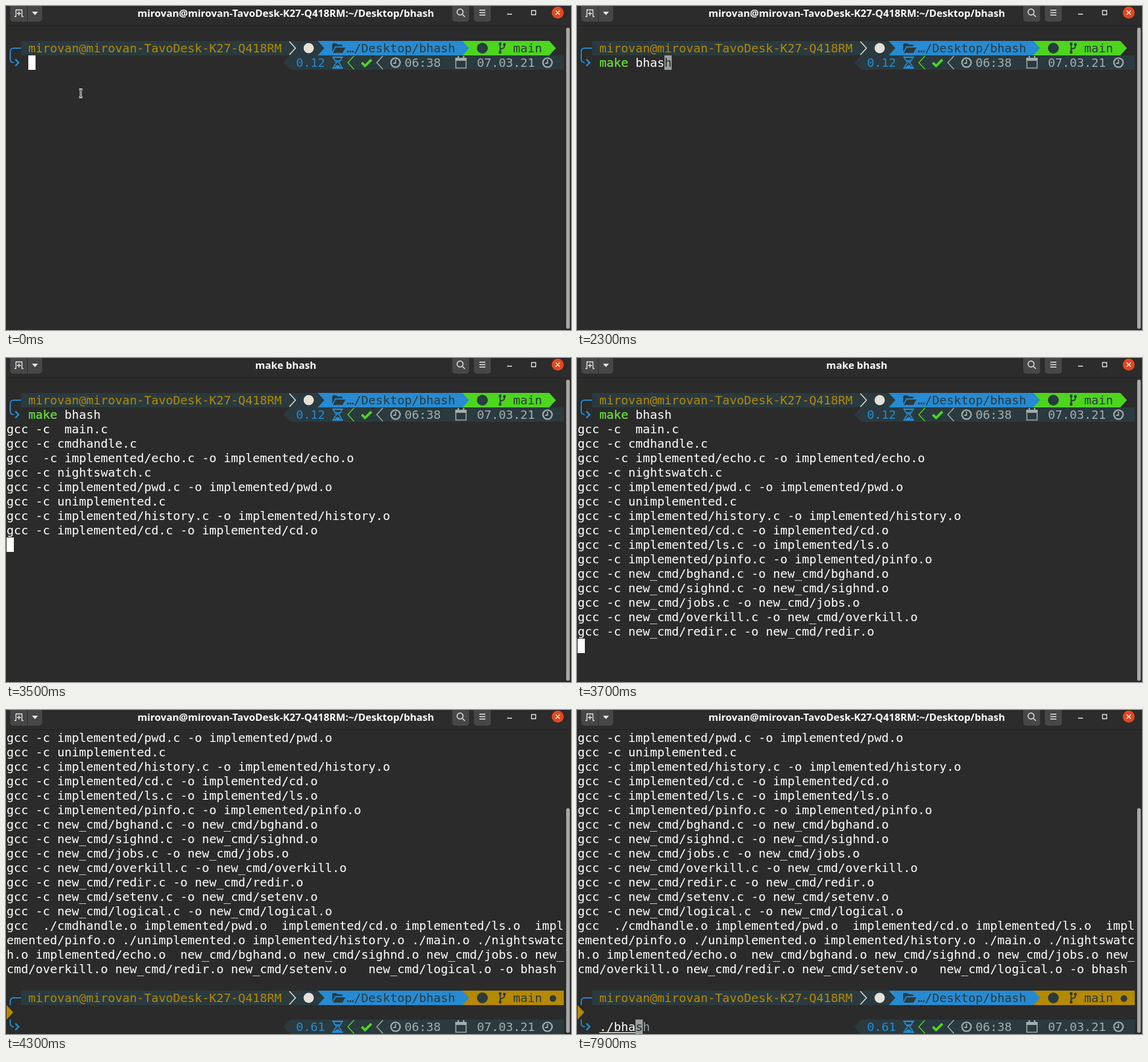
An HTML page with a canvas that plays this animation: 937 px wide and 538 px high, repeating every 8 s.

```html
<!DOCTYPE html>
<html lang="en">
<head>
<meta charset="utf-8">
<title>Terminal build</title>
<style>
  html, body { margin: 0; width: 100%; height: 100%; overflow: hidden; background: #2a2b2a; }
  canvas { display: block; }
</style>
</head>
<body>
<canvas id="stage" width="937" height="538"></canvas>
<script>
const ctx = document.getElementById('stage').getContext('2d');
const LOOP = 8000, CELL = 12, ROW = 24, TOP = 34, VISIBLE_ROWS = 21, COLUMNS = 77;
const MONO = '20px "DejaVu Sans Mono", monospace';
const BG = '#2a2b2a', TEAL = '#2a3a3f', BLUE = '#268bd2', GREEN = '#4cd61d', YELLOW = '#b58900',
      GREY = '#a5adab', HINT = '#98a1a1', LIGHT = '#e6e2d8', WHITE = '#fff', RED = '#dc322f';
const HOST = 'mirovan@mirovan-TavoDesk-K27-Q418RM';
const SHELL_TITLE = HOST + ':~/Desktop/bhash';

const withObject = path => `${path}.c -o ${path}.o`;
const inDir = (dir, names) => names.split(' ').map(name => 'gcc -c ' + withObject(dir + '/' + name));
const COMPILE = [
  'gcc -c  main.c', 'gcc -c cmdhandle.c', 'gcc  -c ' + withObject('implemented/echo'), 'gcc -c nightswatch.c',
  ...inDir('implemented', 'pwd'), 'gcc -c unimplemented.c',
  ...inDir('implemented', 'history cd ls pinfo'),
  ...inDir('new_cmd', 'bghand sighnd jobs overkill redir setenv logical')
];
const LINK = ('gcc  ./cmdhandle.o implemented/pwd.o  implemented/cd.o implemented/ls.o  implemented/pinfo.o ' +
  './unimplemented.o implemented/history.o ./main.o ./nightswatch.o implemented/echo.o  new_cmd/bghand.o ' +
  'new_cmd/sighnd.o new_cmd/jobs.o new_cmd/overkill.o new_cmd/redir.o new_cmd/setenv.o   new_cmd/logical.o -o bhash')
  .match(new RegExp(`.{1,${COLUMNS}}`, 'g'));

// [time, typed, suggestion, cursor visible]
const MAKE_INPUT = [
  [0, '', '', 1], [300, '', '', 0], [500, '', '', 1], [700, 'ma', 'ke clean', 1],
  [1000, 'make', ' clean', 1], [1100, 'make ', 'clean', 1], [1700, 'make ', 'clean', 0],
  [1800, 'make ', 'clean', 1], [2000, 'make b', 'hash', 1], [2100, 'make bha', 'sh', 1],
  [2300, 'make bhas', 'h', 1], [2700, 'make bhash', '', 1], [3200, 'make bhash', '', 0]
];
const RUN_INPUT = [
  [3900, '', '', 1], [4300, '', '', 0], [4400, '', '', 1], [5000, '', '', 0], [5600, '', '', 1],
  [6200, '', '', 0], [6800, '', '', 1], [6900, '.', '/bhash', 1], [7200, './', 'bhash', 1],
  [7500, './', 'bhash', 0], [7800, './', 'bhash', 1], [7900, './bha', 'sh', 1]
];
// [time, compile lines printed]
const PROGRESS = [[0, 0], [3200, 1], [3300, 3], [3400, 5], [3500, 8], [3600, 12], [3700, 15], [3800, 17]];
const at = (steps, time) => steps.filter(step => step[0] <= time).pop();

function rect(x, y, w, h, color) {
  ctx.fillStyle = color;
  ctx.fillRect(x, y, w, h);
}
function disc(x, y, r, color) {
  ctx.fillStyle = color;
  ctx.beginPath();
  ctx.arc(x, y, r, 0, 7);
  ctx.fill();
}
function box(x, y, w, h, radii, color) {
  ctx.fillStyle = color;
  ctx.beginPath();
  ctx.roundRect(x, y, w, h, radii);
  ctx.fill();
}
function fillPath(d, color) {
  ctx.fillStyle = color;
  ctx.fill(new Path2D(d));
}
function strokePath(d, color, width = 2) {
  ctx.strokeStyle = color;
  ctx.lineWidth = width;
  ctx.stroke(new Path2D(d));
}
function text(str, x, y, color) {
  ctx.font = MONO;
  ctx.fillStyle = color;
  [...str].forEach((ch, i) => ctx.fillText(ch, x + i * CELL, y + 19));
}
function arrow(x, color) {
  fillPath(`M${x} 0L${x + 11} 12L${x} 24Z`, color);
}
function clock(x) {
  ctx.strokeStyle = GREY;
  ctx.lineWidth = 2.4;
  ctx.beginPath();
  ctx.arc(x, 12, 7.6, 0, 7);
  ctx.stroke();
  strokePath(`M${x} 7V13H${x - 4}`, GREY, 1.8);
}

function statusRow(elapsed) {
  fillPath('M471 0L460 12L471 24Z', TEAL);
  rect(471, 0, 454, 24, TEAL);
  text(elapsed, 481, 0, BLUE);
  strokePath('M541 3H559M541 21H559', BLUE, 2.4);
  strokePath('M543.5 3C543.5 9 548 10 548 12S543.5 15 543.5 21M556.5 3C556.5 9 552 10 552 12S556.5 15 556.5 21', BLUE, 1.8);
  fillPath('M545 20Q550 12 555 20ZM546 8H554L550 12Z', BLUE);
  strokePath('M577 1L567 12L577 23', GREEN, 1.6);
  strokePath('M590 12L595.5 17.5L606 7', GREEN, 4);
  strokePath('M625 1L615 12L625 23', GREY, 1.6);
  clock(646);
  text('06:38', 661, 0, GREY);
  strokePath('M746 5H763V21H746Z', GREY, 1.6);
  rect(745, 4, 19, 5, GREY);
  strokePath('M750 1V6M759 1V6', GREY, 2.4);
  text('07.03.21', 781, 0, GREY);
  clock(898);
}

function prompt(y, elapsed, dirty) {
  ctx.save();
  ctx.translate(0, y);
  const gitColor = dirty ? YELLOW : GREEN;
  rect(25, 0, 492, 24, TEAL);
  text(HOST, 37, 0, YELLOW);
  strokePath('M470 1L480 12L470 23', LIGHT, 1.6);
  disc(502, 12, 8.5, LIGHT);
  rect(517, 0, 240, 24, BLUE);
  arrow(517, TEAL);
  fillPath('M541 18V6Q541 4 543 4H548L550 6H556Q558 6 558 8V9H546ZM542 20L547 11H563L558 20Z', TEAL);
  text('…/Desktop/bhash', 565, 0, TEAL);
  rect(757, 0, dirty ? 168 : 144, 24, gitColor);
  arrow(757, BLUE);
  disc(790, 12, 9, TEAL);
  strokePath('M819.5 7V17M826.5 8V9Q826.5 12 823 12.5Q819.5 13 819.5 16', TEAL, 2);
  [[819.5, 5], [819.5, 19], [826.5, 6]].forEach(([x, cy]) => disc(x, cy, 2.4, TEAL));
  text('main', 841, 0, TEAL);
  if (dirty) disc(907, 13, 5.5, TEAL);
  else arrow(901, gitColor);

  strokePath('M25 12H13Q7 12 7 18V24', BLUE);
  if (dirty) {
    ctx.translate(0, ROW);
    arrow(1, gitColor);
  }
  ctx.translate(0, ROW);
  strokePath('M7 0V6Q7 12 13 12', BLUE);
  strokePath('M15.5 6.5L21 12L15.5 17.5', BLUE, 2.6);
  statusRow(elapsed);
  ctx.restore();
}

function inputLine(y, [, typed, suggestion, cursorOn]) {
  const x = 37, command = typed.split(' ')[0], isPath = command.startsWith('./');
  const color = isPath ? WHITE : ['make', '.'].includes(command) ? GREEN : RED;
  text(typed, x, y, WHITE);
  const cursorX = x + typed.length * CELL;
  if (command) {
    const width = command.length * CELL;
    if (!isPath) {
      text(command, x, y, color);
    } else {
      rect(x, y + 21, width, 1.4, WHITE);
    }
  }
  text(suggestion, cursorX, y, HINT);
  if (cursorOn) {
    rect(cursorX, y, CELL, ROW, suggestion ? HINT : WHITE);
    text(suggestion.slice(0, 1), cursorX, y, BG);
  }
}

function titleBar(title) {
  rect(0, 0, 937, 33, '#2c2c2c');
  rect(0, 32, 937, 1, '#232323');
  box(7, -6, 53, 32, 5, '#474747');
  rect(35, 0, 1, 26, '#2e2e2e');
  box(740, -6, 28, 32, 5, '#474747');
  box(776, -6, 28, 32, 5, '#474747');
  strokePath('M14 17.5H16.5V6.5H26.5V17.5H29M21.5 9V16M18 12.5H25', '#f0f0f0', 1.3);
  fillPath('M43 9.5H53L48 15Z', '#f0f0f0');
  ctx.font = 'bold 16.6px "Noto Sans", sans-serif';
  ctx.textAlign = 'center';
  ctx.fillStyle = WHITE;
  ctx.fillText(title, 464, 18);
  ctx.textAlign = 'left';
  strokePath('M758 10A5 5 0 1 1 748 10A5 5 0 1 1 758 10M757 14L761 18', '#f0f0f0', 1.4);
  strokePath('M785 7H795M785 11H795M785 15H795', '#f0f0f0', 1.4);
  strokePath('M831 13.5H839M871.5 7.5H878.5V14.5H871.5Z', '#f0f0f0', 1.3);
  disc(915, 11, 10, '#e2481d');
  strokePath('M911.5 7.5L918.5 14.5M918.5 7.5L911.5 14.5', WHITE, 1.4);
}

function draw(time) {
  const finished = time >= 3900, dirty = time >= 4300;
  const building = time >= 3200 && !finished;
  const printed = COMPILE.slice(0, at(PROGRESS, time)[1]).concat(finished ? LINK : []);
  const newPromptRow = 3 + printed.length + 1;
  const lastRow = newPromptRow + (dirty ? 2 : 1);
  const scroll = finished ? lastRow + 1 - VISIBLE_ROWS : 0;
  const rowY = row => TOP + (row - scroll) * ROW;

  rect(0, 0, 937, 538, BG);
  prompt(rowY(1), '0.12', false);
  inputLine(rowY(2), at(MAKE_INPUT, time));
  printed.forEach((line, i) => text(line, 1, rowY(3 + i), WHITE));
  if (building) rect(1, rowY(3 + printed.length), CELL, ROW, WHITE);
  if (finished) {
    prompt(rowY(newPromptRow), '0.61', dirty);
    inputLine(rowY(lastRow), at(RUN_INPUT, time));
  }
  if (time < 500) {
    const beam = 'M121 138.5H123L124 139.5L125 138.5H127M124 139V151M121 151.5H123L124 150.5L125 151.5H127';
    strokePath(beam, WHITE, 3);
    strokePath(beam, '#111', 1);
  }
  titleBar(building ? 'make bhash' : SHELL_TITLE);
  const thumbTop = finished ? 163 : 36;
  box(929, thumbTop, 6, 536 - thumbTop, 3, '#a8a8a8');
}

const start = performance.now();
function tick() {
  draw((performance.now() - start) % LOOP);
  requestAnimationFrame(tick);
}
tick();
</script>
</body>
</html>
```
